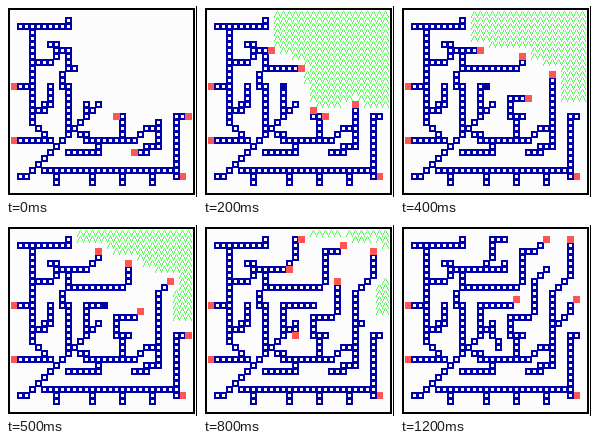
These frames come from a looping animation (191x191 px, 1300 ms). An HTML page with a canvas:

```html
<!DOCTYPE html>
<html lang="en">
<head>
<meta charset="utf-8">
<title>Growing branches</title>
<style>
html, body { margin: 0; width: 100%; height: 100%; overflow: hidden; background: #fff; }
canvas { display: block; width: 191px; height: 191px; }
</style>
</head>
<body>
<canvas id="stage" width="191" height="191"></canvas>
<script>
const ctx = document.getElementById('stage').getContext('2d');
const SIZE = 30, CELL = 6, STEP = 100, STEPS = 13;
const BLUE = '#0000aa', RED = '#ff5555', GREEN = '#55ff55';

// Corners "column,row" of the branches that are there from the start.
const roots = [
  '9,1 9,2 1,2',
  '3,2 3,18 6,21 1,21',
  '1,12 3,12',
  '4,8 6,8 7,7 7,5 6,5',
  '7,6 9,6 9,9 10,9',
  '9,9 8,10 8,12 9,12 9,20 6,23 5,24 2,27 1,27',
  '6,12 6,15 5,15 5,16 4,16',
  '12,15 12,17 10,19 11,20 12,20 12,21 20,21 22,19 24,19',
  '12,16 13,16 14,15',
  '24,18 24,22 22,22 22,23 21,23',
  '9,23 14,23 14,22',
  '18,17 18,20',
  '4,25 5,26 27,26 27,17 28,17',
  '27,26 27,27'
];
for (const c of [7, 13, 18, 23]) roots.push(`${c},27 ${c},28`);

// Corners "column,row,step" of the branches that grow.
const shoots = [
  { path: '10,6,2 11,6,3 12,6,4 14,4,4.6 14,3,5 14,1,7 16,1,9' },
  { path: '13,6,8 15,6,9 16,6,11 16,5,11' },
  { path: '11,9,1 13,9,1 18,9,3 19,5,5 19,3,6.6 21,3,7.5 22,2,8 23,1,10', stays: true },
  { path: '17,17,0 17,17,1 17,14,2.8 18,14,3 20,14,4 21,13,5 21,9,7 21,8,8 23,6,10' },
  { path: '24,17,1 24,12,3 24,10,4 26,8,5 27,7,6 27,3,8 27,1,10', stays: true },
  { path: '25,15,7 27,13,10 27,12,11 28,11,12' },
  { path: '12,14,1 12,12,2 13,12,4 15,12,5 17,12,7', quiet: true },
  { path: '18,11,12' },
  { path: '14,16,7 14,17,8 15,18,9 15,19,11' },
  { path: '19,17,2' },
  { path: '20,23,0' },
  { path: '9,0,1', brief: true },
  { path: '29,17,0', brief: true },
  { path: '29,17,5', brief: true }
];
const ends = [[0, 12], [0, 21], [28, 27]];

// Walks from corner to corner, diagonally first; each cell gets its step.
function trace(path) {
  const keys = path.split(' ').map(k => k.split(',').map(Number));
  let [x, y, t = 0] = keys[0];
  const out = [[x, y, t]];
  for (const [kx, ky, kt = 0] of keys.slice(1)) {
    const n = Math.max(Math.abs(kx - x), Math.abs(ky - y), 1);
    for (let i = 1; i <= n; i++) {
      x += Math.sign(kx - x);
      y += Math.sign(ky - y);
      out.push([x, y, Math.ceil(t + (kt - t) * i / n - 1e-6)]);
    }
    t = kt;
  }
  return out;
}

const base = roots.flatMap(trace);
for (const s of shoots) s.cells = trace(s.path);

function cellsAt(s) {
  const blue = [...base], red = [], dark = [];
  for (const { cells, stays, quiet, brief } of shoots) {
    const grown = cells.filter(p => p[2] <= s);
    if (!grown.length) continue;
    const tip = grown[grown.length - 1];
    const done = grown.length === cells.length;
    if (tip[2] === s || (stays && done)) (quiet ? dark : red).push(tip);
    if (!brief) blue.push(...grown);
  }
  return { blue, red, dark };
}

// The open area lies above a line drawn through the outermost tips.
function openCells(s, { blue, red }) {
  if (!s) return [];
  const tips = red
    .filter(([c, r]) => c > 8 && c < SIZE - 1 && r < 18)
    .filter(([c, r]) => !red.some(([x, y]) => x > c && y <= r - 3))
    .sort((a, b) => a[0] - b[0] || a[1] - b[1]);
  if (!tips.length) return [];
  const wall = 16.5 - s / 5;
  const last = tips[tips.length - 1][0];
  const line = [[10, tips[0][1]], ...tips, [last + 1, wall], [SIZE, wall]];
  const filled = [...blue, ...red];
  const gap = s / 1.8;
  const free = (c, r) => filled.every(([x, y]) => (x - c) ** 2 + (y - r) ** 2 >= Math.max(gap, 1));
  const out = [];
  for (let i = 1; i < line.length; i++) {
    const [ax, ay] = line[i - 1], [bx, by] = line[i];
    for (let c = Math.max(ax + 1, 11); c <= Math.min(bx, SIZE - 1); c++) {
      const depth = ay + (by - ay) * (c - ax) / (bx - ax);
      for (let r = 0; r < depth - 1; r++) if (free(c, r)) out.push([c, r]);
    }
  }
  return out;
}

const at = n => 5 + n * CELL;

function squares(cells, color, inset = 0) {
  ctx.fillStyle = color;
  for (const [c, r] of cells) ctx.fillRect(at(c) + inset, at(r) + inset, 7 - 2 * inset, 7 - 2 * inset);
}

function carets(cells) {
  ctx.fillStyle = GREEN;
  for (const [c, r] of cells) {
    for (let i = 0; i < 7; i++) {
      const d = Math.round(i / 2);
      ctx.fillRect(at(c) + 3 - d, at(r) + i, 1, 1);
      ctx.fillRect(at(c) + 3 + d, at(r) + i, 1, 1);
    }
  }
}

function draw(s) {
  const now = cellsAt(s);
  ctx.fillStyle = '#fff';
  ctx.fillRect(0, 0, 191, 191);
  ctx.fillStyle = '#fcfcfc';
  ctx.fillRect(2, 2, 187, 187);
  ctx.strokeStyle = '#000';
  ctx.lineWidth = 2;
  ctx.strokeRect(3, 3, 185, 185);
  ctx.fillStyle = '#000';
  ctx.fillRect(190, 0, 1, 191);

  carets(openCells(s, now));
  squares(ends, RED);
  squares(now.blue, BLUE);
  squares(now.blue, '#fff', 2);
  squares(now.dark, BLUE);
  squares(now.red, RED);
}

const start = performance.now();
let shown = -1;
function tick() {
  const s = Math.floor(Math.max(0, performance.now() - start) / STEP) % STEPS;
  if (s !== shown) draw(shown = s);
  requestAnimationFrame(tick);
}
tick();
</script>
</body>
</html>
```
